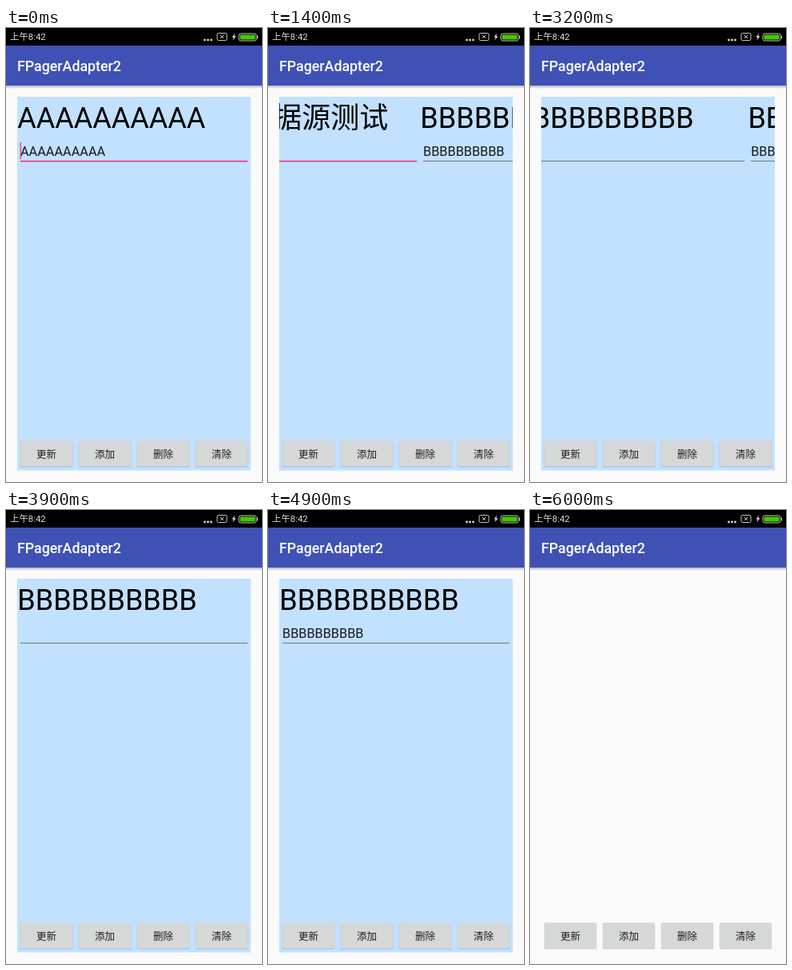
An HTML page that plays this animation: 320x568 px, repeating every 6.1 s.

```html
<!DOCTYPE html>
<html lang="zh">
<head>
<meta charset="utf-8">
<title>Pager demo</title>
<style>
  html, body { margin: 0; width: 100%; height: 100%; overflow: hidden; background: #fafafa; }
  svg { display: block; width: 320px; height: 568px; font-family: Roboto, "Noto Sans CJK SC", "Noto Sans CJK", sans-serif; }
  .heading { font-size: 36px; }
  .field { font-size: 16.3px; fill: #17191c; }
  .label { font-size: 12.5px; text-anchor: middle; fill: #1c1c1c; }
</style>
</head>
<body>
<svg viewBox="0 0 320 568">
  <defs>
    <clipPath id="window"><rect x="14" y="86" width="292" height="467.5"/></clipPath>
    <linearGradient id="shade" x2="0" y2="1">
      <stop offset="0" stop-opacity=".27"/>
      <stop offset="1" stop-opacity="0"/>
    </linearGradient>
  </defs>

  <rect width="320" height="568" fill="#fafafa"/>
  <rect y="72" width="320" height="4" fill="url(#shade)"/>
  <rect y="22" width="320" height="50" fill="#3f51b5"/>
  <text x="14" y="54.3" font-size="17.8" font-weight="500" fill="#fff">FPagerAdapter2</text>

  <rect width="320" height="22" fill="#000"/>
  <text x="5" y="15.3" font-size="11.4" fill="#dcdcdc">上午8:42</text>
  <g fill="#d8d8d8">
    <circle cx="248.5" cy="15" r="1.4"/>
    <circle cx="252.5" cy="15" r="1.4"/>
    <circle cx="256.5" cy="15" r="1.4"/>
    <path d="M286 6.5l-3.5 5h2l-1 4 4-5.300h-2.200z"/>
  </g>
  <g fill="none" stroke="#c8c8c8">
    <rect x="264" y="6.500" width="12" height="9" rx="1.500"/>
    <path d="M268 9l4 4m0-4l-4 4"/>
    <rect x="291" y="7" width="22" height="9" rx="2.500"/>
    <path d="M314.500 9.500v4"/>
  </g>
  <rect x="292.500" y="8.500" width="19" height="6" rx="1" fill="#46c800"/>

  <g id="pager" clip-path="url(#window)">
    <rect x="14" y="86" width="292" height="468" fill="#c2e1ff"/>
    <g id="track"></g>
  </g>
  <g id="buttons"></g>
</svg>

<script>
const LOOP = 6100, STEP = 100, PAGE = 292;
const UPDATE = 300, FOCUS_MOVE = 1900, REMOVE = 2700, CLEAR = 6000;

// [time, scroll position in pages]
const scrollKeys = [
  [0, 0], [1100, 0], [1200, .07], [1400, .397], [2000, .795], [2400, 1],
  [3100, 1], [3200, 1.116], [3500, 2], [3900, 3], [4000, 3],
  [4900, 2], [5500, 1], [LOOP, 1]
];

const byId = id => document.getElementById(id);

function add(parent, tag, attrs, text = "") {
  const node = document.createElementNS("http://www.w3.org/2000/svg", tag);
  for (const name in attrs) node.setAttribute(name, attrs[name]);
  node.textContent = text;
  parent.append(node);
  return node;
}

function makePage(index) {
  const group = add(byId("track"), "g", { transform: `translate(${index * PAGE} 0)` });
  return {
    heading: add(group, "text", { class: "heading", x: 14.3, y: 124.5 }),
    field: add(group, "text", { class: "field", x: 18, y: 160 }),
    line: add(group, "rect", { x: 18, width: 284 }),
    cursor: add(group, "rect", { x: 17.6, y: 143, width: 1.4, height: 21, fill: "#f0437e" })
  };
}

function showPage(page, heading, field, focused, cursorOn) {
  page.heading.textContent = heading;
  page.field.textContent = field;
  page.line.setAttribute("y", focused ? 165.8 : 166);
  page.line.setAttribute("height", focused ? 1.8 : .9);
  page.line.setAttribute("fill", focused ? "#f0437e" : "#626c78");
  page.cursor.style.display = focused && cursorOn ? "" : "none";
}

function scrollAt(time) {
  const i = scrollKeys.findIndex(key => key[0] > time);
  const [t0, p0] = scrollKeys[i - 1], [t1, p1] = scrollKeys[i];
  return p0 + (p1 - p0) * (time - t0) / (t1 - t0);
}

["更新", "添加", "删除", "清除"].forEach((name, i) => {
  const x = 18 + i * 73, group = byId("buttons");
  add(group, "rect", { x: x - .3, y: 517, width: 65.6, height: 32.5, rx: 1.5, fill: "#000", opacity: .16 });
  add(group, "rect", { x, y: 516.3, width: 65, height: 32.3, rx: 1.5, fill: "#d6d7d7" });
  add(group, "text", { class: "label", x: x + 32.5, y: 537.6 }, name);
});

const pages = [0, 1, 2, 3].map(makePage);
const tens = letter => letter.repeat(10);
const bText = tens("B");

function render(time) {
  const cursorOn = time % 1000 < 500 || time >= FOCUS_MOVE;
  const removed = time >= REMOVE;
  byId("pager").style.display = time < CLEAR ? "" : "none";
  byId("track").setAttribute("transform", `translate(${-PAGE * scrollAt(time)} 0)`);
  showPage(pages[0], time < UPDATE ? tens("A") : "更新数据源测试", tens("A"), time < FOCUS_MOVE, cursorOn);
  showPage(pages[1], bText, removed ? "" : bText, time >= FOCUS_MOVE && !removed, cursorOn);
  showPage(pages[2], bText, bText, false);
  showPage(pages[3], bText, "", false);
}

const start = performance.now();
function tick() {
  const time = (performance.now() - start) % LOOP;
  render(Math.floor(time / STEP) * STEP);
  requestAnimationFrame(tick);
}
tick();
</script>
</body>
</html>
```
